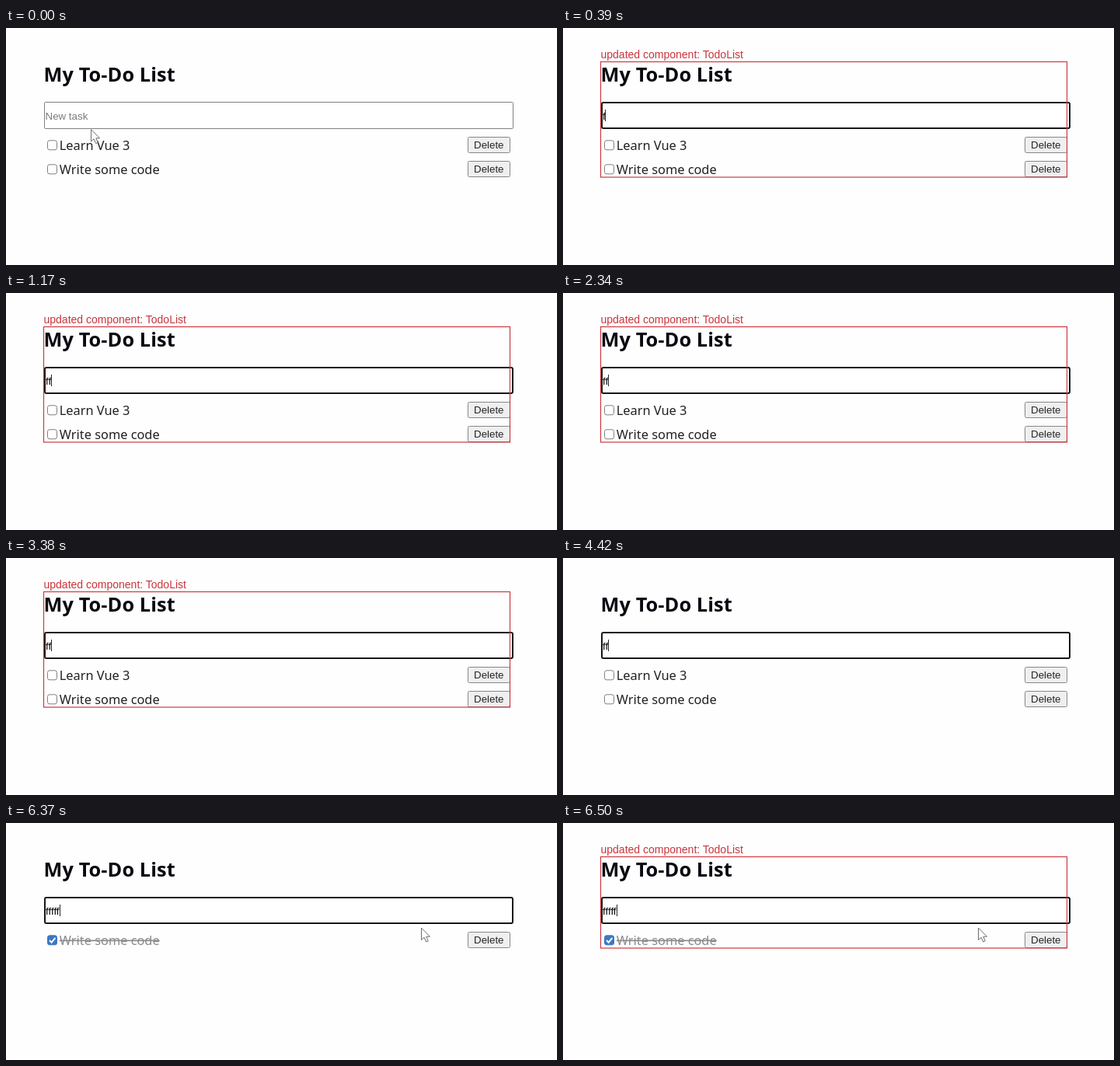
Recreate the animation shown at these times as an HTML page. Size 709 by 305 pixels, loop 7280 ms.

```html
<!DOCTYPE html>
<html lang="en">
<head>
<meta charset="utf-8">
<title>To-do list</title>
<style>
html, body { margin: 0; width: 100%; height: 100%; overflow: hidden; background: #fefefe; }
svg { display: block; width: 100%; height: 100%; }
text { font: 13.33px "Liberation Sans", Arial, sans-serif; font-variant-ligatures: none; white-space: pre; }
.title { font: 700 25.3px "Noto Sans", "Open Sans", sans-serif; letter-spacing: .1px; fill: #080810; }
.task { font: 16.35px "Noto Sans", "Open Sans", sans-serif; fill: #202020; }
.done .task { fill: #8a8a8a; text-decoration: line-through; }
.hint { fill: #7c7c7c; }
.label { font-size: 14px; fill: #c8343c; }
.frame { fill: none; stroke: #cc3a42; stroke-width: 1.2; }
.check { fill: #fff; stroke: #808080; }
.done .check { fill: #3b78c4; stroke: #3b78c4; }
.tick { fill: none; stroke: #fff; stroke-width: 1.9; visibility: hidden; }
.done .tick { visibility: inherit; }
.button { fill: #efefef; stroke: #868686; }
.caption { fill: #262626; }
.field { fill: #fff; stroke: #808080; }
.focus { fill: #fff; stroke: #181818; stroke-width: 2; }
.caret { stroke: #222; }
.pointer { fill: #fff; stroke: #6c6c6c; stroke-width: 1; stroke-linejoin: round; }
</style>
</head>
<body>
<svg viewBox="0 0 709 305">
  <rect width="709" height="305" fill="#fefefe"/>
  <text class="title" x="48.5" y="69">My To-Do List</text>
  <g id="idle">
    <rect class="field" x="49.5" y="95.5" width="603" height="34" rx="1"/>
    <text class="hint" x="50.5" y="117.5">New task</text>
  </g>
  <g id="active">
    <rect class="focus" x="50" y="96" width="602" height="33" rx="2"/>
    <text id="typed" x="51" y="117.5"></text>
    <line id="caret" class="caret" y1="105" y2="120"/>
  </g>
  <g id="tasks"></g>
  <g id="flash">
    <text class="label" x="48.5" y="39">updated component: TodoList</text>
    <rect id="frame" class="frame" x="48.5" y="43.5" width="600"/>
  </g>
  <path id="pointer" class="pointer" d="M0 0V15.5L3.6 12.2L6.2 18L8.8 16.8L6.3 11.2H11Z"/>
</svg>
<script>
const LOOP = 7280;
const ROW = 31;
const $ = id => document.getElementById(id);
const show = (node, on) => node.setAttribute("visibility", on ? "inherit" : "hidden");

const rows = ["Learn Vue 3", "Write some code"].map(name => {
  const row = document.createElementNS("http://www.w3.org/2000/svg", "g");
  row.innerHTML = `
    <rect class="check" x="53.5" y="144.8" width="12" height="12" rx="2.5"/>
    <path class="tick" d="M56 151l2.6 2.7 4.8-5.8"/>
    <text class="task" x="68.8" y="157">${name}</text>
    <rect class="button" x="594.5" y="140.5" width="54" height="20" rx="2"/>
    <text class="caption" x="602" y="155.3">Delete</text>`;
  $("tasks").append(row);
  return row;
});

// Each step overrides part of the state before it.
const steps = [
  { at: 0, focus: false, typed: "", flash: false, done: false, removed: false, mouse: [109.5, 130.6] },
  { at: 130, focus: true, mouse: null },
  { at: 390, typed: "f", flash: true },
  { at: 650, typed: "ff" },
  { at: 1040, flash: false },
  { at: 1170, flash: true },
  { at: 4420, flash: false },
  { at: 4550, typed: "fffff", flash: true },
  { at: 4680, done: true, mouse: [534.5, 135] },
  { at: 4810, removed: true },
  { at: 6370, flash: false },
  { at: 6500, flash: true }
];

function stateAt(t) {
  return Object.assign({}, ...steps.filter(step => step.at <= t));
}

function draw(t) {
  const s = stateAt(t);
  show($("idle"), !s.focus);
  show($("active"), s.focus);
  $("typed").textContent = s.typed;
  const caretX = Math.floor(51 + s.typed.length * 3.7) + 0.5;
  $("caret").setAttribute("x1", caretX);
  $("caret").setAttribute("x2", caretX);

  show(rows[0], !s.removed);
  rows[1].setAttribute("transform", `translate(0 ${s.removed ? 0 : ROW})`);
  rows[1].setAttribute("class", s.done ? "done" : "");

  show($("flash"), s.flash);
  $("frame").setAttribute("height", s.removed ? 117.5 : 148.5);

  show($("pointer"), s.mouse);
  if (s.mouse) $("pointer").setAttribute("transform", `translate(${s.mouse})`);
}

const start = performance.now();
function tick() {
  draw((performance.now() - start) % LOOP);
  requestAnimationFrame(tick);
}
tick();
</script>
</body>
</html>
```
